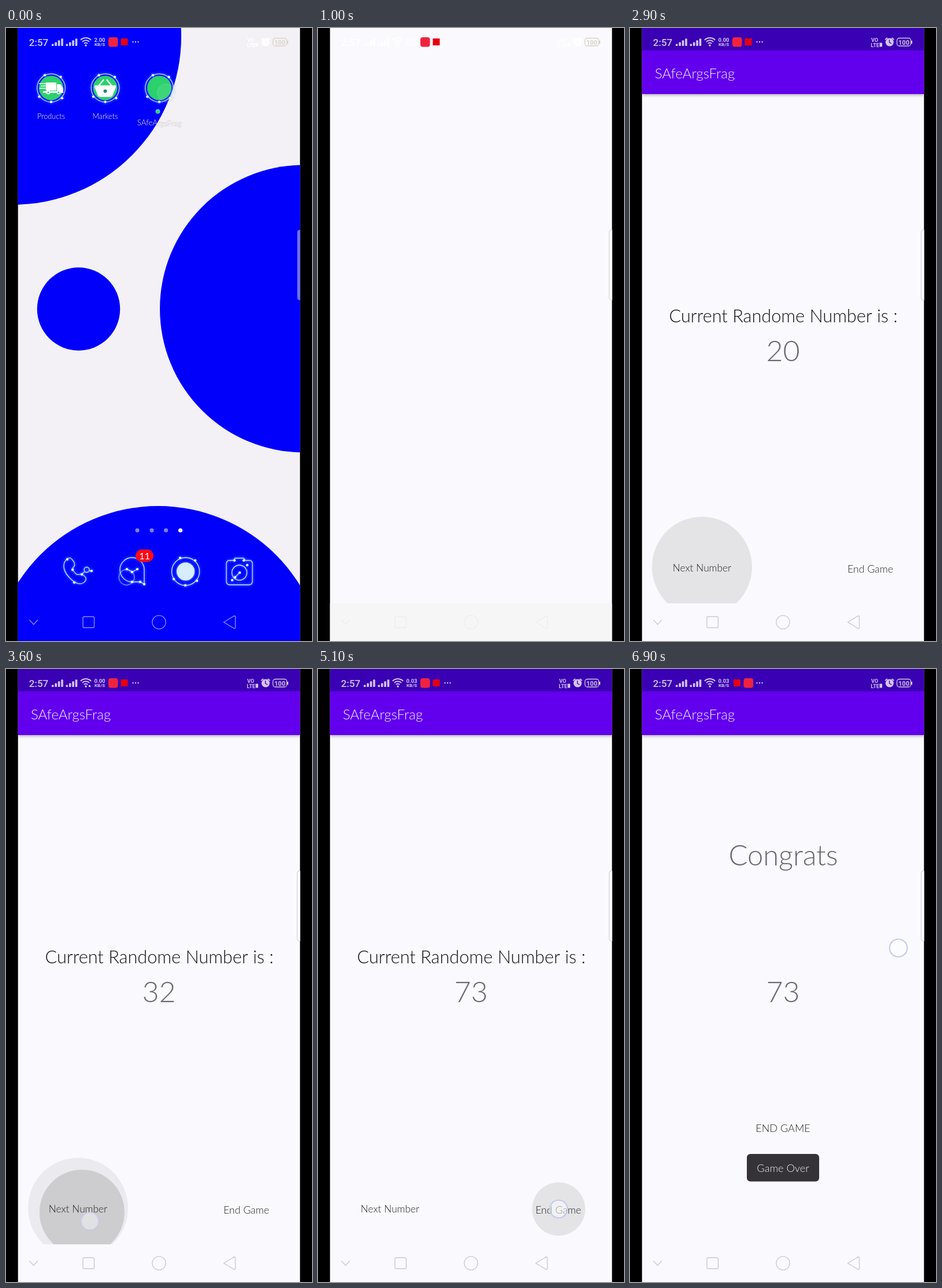
An HTML page with a canvas for the animation above (7000 ms loop, 529 px wide and 1058 px high).

```html
<!DOCTYPE html>
<html lang="en">
<head>
<meta charset="utf-8">
<title>Random number game</title>
<style>
html, body { margin: 0; width: 100%; height: 100%; overflow: hidden; background: #000; }
canvas { display: block; width: 100vw; height: 100vh; }
</style>
</head>
<body>
<canvas id="stage" width="529" height="1058"></canvas>
<script>
const g = document.getElementById('stage').getContext('2d');
const LOOP = 7000, STEP = 100;
const LEFT = 20.5, WIDTH = 488;
const PAGE = '#faf9fd', BLUE = '#0000fb', GREEN = '#2bd26b', NEON = '#c4e4ff';

const clamp = v => Math.max(0, Math.min(1, v));
const mix = (a, b, p) => a + (b - a) * p;

function rect(x, y, w, h, fill, r = 0) {
  g.beginPath();
  g.roundRect(x, y, w, h, r);
  g.fillStyle = fill;
  g.fill();
}
function disc(x, y, r, fill) {
  g.beginPath();
  g.arc(x, y, r, 0, 7);
  g.fillStyle = fill;
  g.fill();
}
function line(d, color, width = 1.3) {
  g.strokeStyle = color;
  g.lineWidth = width;
  g.stroke(new Path2D(d));
}
function ring(x, y, r, color, width = 1.3) {
  g.beginPath();
  g.arc(x, y, r, 0, 7);
  g.strokeStyle = color;
  g.lineWidth = width;
  g.stroke();
}
function text(s, x, y, size, color, align = 'center', font = '300', family = 'Lato, sans-serif') {
  g.font = `${font} ${size}px ${family}`;
  g.textAlign = align;
  g.fillStyle = color;
  g.fillText(s, x, y);
}
const ui = (s, x, y, size, color, weight = '700') =>
  text(s, x, y, size, color, 'center', weight, 'Roboto, sans-serif');

function faded(alpha, draw) {
  g.save();
  g.globalAlpha *= alpha;
  draw();
  g.restore();
}
function glowing(draw) {
  g.save();
  g.shadowColor = '#6cc0ff';
  g.shadowBlur = 4;
  draw();
  g.restore();
}
const nodes = list => list.forEach(([x, y]) => disc(x, y, 2.1, '#fff'));

function statusBar(t, color, right, battery) {
  ui('2:57', 56.5, 31, 17, color, '500');
  for (const x of [79, 103.5])
    for (let i = 0; i < 4; i++) rect(x + i * 5.4, 27.5 - i * 3.1, 3.6, 3.5 + i * 3.1, color, 1);
  for (const r of [4.5, 8.7, 13]) {
    g.beginPath();
    g.arc(138, 30, r, -Math.PI * .75, -Math.PI * .25);
    g.strokeStyle = color;
    g.lineWidth = 2;
    g.stroke();
  }
  disc(138, 30, 1.8, color);
  if (t >= 3400 && t < 4200) rect(143, 28, 3, 3, color);
  const speed = t < 1500 ? '2.00' : t < 4200 ? '0.00' : '0.03';
  ui(speed, 162, 23.5, 9.5, color);
  ui('KB/S', 162, 31, 8, color);
  const swapped = t >= 6600;
  rect(swapped ? 196.5 : 177, 16, 16.5, 16.5, '#f0233f', 4);
  rect(swapped ? 179 : 198.5, 18, 12, 12, '#e60012', 1);
  for (const x of [219.5, 224, 228.5]) disc(x, 24, 1.2, color);

  ui('VO', 423, 23.5, 9, right);
  ui('LTE', 423.5, 32.5, 9, right);
  rect(431.5, 25.5, 4.5, 7, right, 1);
  disc(448.8, 24.5, 7, right);
  line('M441 20L445 17M456.5 20L452.5 17', right, 2);
  line('M448.5 20V25L452 27', t < 1500 ? PAGE : '#3a00b3', 1.4);
  g.beginPath();
  g.roundRect(461.5, 17.5, 24, 13.5, 4);
  g.strokeStyle = battery;
  g.lineWidth = 1.3;
  g.stroke();
  rect(486, 22, 2, 5, battery);
  ui('100', 473.5, 28.5, 11, battery);
}

function navBar(color) {
  line('M40.5 1021.5L47.8 1029.5L55 1021.5', color, 1.4);
  line('M135 1016H150.5Q152.5 1016 152.5 1018V1033Q152.5 1035 150.5 1035H135Q133 1035 133 1033V1018Q133 1016 135 1016Z', color, 1.4);
  ring(264.5, 1025.5, 11.6, color, 1.4);
  line('M376.5 1025.5L394 1015Q396.5 1014 396.5 1016.5V1034.5Q396.5 1037 394 1036Z', color, 1.4);
}

function sideHandle(fill, stroke) {
  rect(503.5, 348.5, 12, 121, fill, 4);
  if (stroke) {
    g.strokeStyle = stroke;
    g.lineWidth = 1.2;
    g.stroke();
  }
}

function touch(x, y, alpha = 1) {
  faded(alpha, () => {
    disc(x, y, 15.5, 'rgba(255,255,255,.55)');
    ring(x, y, 15.3, '#c3c8ec', 2);
  });
}

function appIcon(x) {
  disc(x, 103.5, 21, GREEN);
  glowing(() => {
    ring(x, 103.5, 24.3, NEON, 1.2);
    nodes([[x - 11, 81.5], [x + 16.5, 84.5], [x - 20.5, 118.5], [x, 127.5], [x + 19, 121]]);
  });
}

function truck() {
  rect(69, 94, 18, 14, '#fff', 1);
  g.fillStyle = '#fff';
  g.fill(new Path2D('M88 97H94L99 104V112H64V109H88Z'));
  line('M57 96H69M60 100H69M58 104H69', '#fff', 1.5);
  for (const x of [73, 91]) {
    disc(x, 111, 3.6, '#fff');
    disc(x, 111, 1.5, GREEN);
  }
}

function basket() {
  g.fillStyle = '#fff';
  g.fill(new Path2D('M153 99H190V102L184 117Q183 119 180 119H163Q160 119 159 117L153 102Z'));
  line('M160 100L169 89M183 100L174 89', '#fff', 2.4);
  disc(171.5, 109, 3, '#1a8c78');
}

function dock() {
  glowing(() => {
    line('M106 916C95 925 100 940 112 951C122 961 133 962 138 953C140 948 135 945 131 943C127 941 124 946 121 942C117 938 113 934 117 930C121 926 117 920 114 917C112 914 108 914 106 916Z', NEON);
    ring(139.5, 935, 4.5, NEON);
    line('M131 943L136 938M143 937H148', NEON);
    nodes([[106, 917], [118, 957], [131, 943], [148, 937], [115, 935]]);

    line('M239 960V935A21 21 0 1 0 218 956H232L239 960', NEON);
    ring(208.5, 948, 13.5, NEON, .8);
    line('M209 934L218 939L227 934', NEON);
    nodes([[209, 934], [218, 939], [227, 934], [232, 956], [218, 956], [239, 960]]);

    ring(310.5, 938, 24, NEON);
    disc(310.5, 938, 15.5, '#d6ecff');
    nodes([[301, 914.5], [327, 919], [290, 951], [310, 962], [330, 954]]);

    line('M386 919H393L396 915H411L414 919H421Q426 919 426 925V955Q426 961 420 961H387Q381 961 381 955V925Q381 919 386 919Z', NEON);
    ring(403.5, 940, 13, NEON);
    line('M396 948L404 940', NEON);
    nodes([[395, 919], [411, 919], [417, 927], [404, 940], [396, 948], [391, 953]]);
  });
  rect(224, 900, 31, 21.5, '#fb0a16', 10.7);
  text('11', 239.5, 917, 16, '#fff', 'center', '400');
}

function home(t) {
  rect(LEFT, 0, WIDTH, 1058, '#f3f1f5');
  disc(12, 14, 291, BLUE);
  disc(514, 484.5, 248, BLUE);
  disc(125.5, 485, 71.7, BLUE);
  disc(263, 1113, 288, BLUE);
  [78, 171.5, 265].forEach(appIcon);
  truck();
  basket();
  disc(262.5, 144, 4, '#3fd08a');
  g.save();
  g.shadowColor = 'rgba(0,0,0,.35)';
  g.shadowBlur = 2;
  g.shadowOffsetY = 1;
  text('Products', 78, 157, 12.7, '#fff');
  text('Markets', 171.5, 157, 12.7, '#fff');
  text('SAfeArgsFrag', 265, 168, 13.3, '#fff');
  g.restore();
  [227, 252, 276.5, 301.5].forEach((x, i) => disc(x, 867, 3.6, i == 3 ? '#fff' : '#8080fd'));
  dock();
  sideHandle('rgba(205,205,255,.55)');
  if (t < 300) touch(277, 112, t < 100 ? .15 : .9);
}

function launch(t) {
  home(t);
  const p = 1 - (1 - clamp((t - 200) / 600)) ** 2;
  if (p > 0) faded(clamp(p * 2.5), () =>
    rect(mix(241, LEFT, p), mix(79, 0, p), mix(48, WIDTH, p), mix(48, 1058, p), PAGE, 24 * (1 - p)));
  const light = p > .7;
  statusBar(t, light ? '#fff' : 'rgba(255,255,255,.8)', '#fff', '#dcd3cc');
  navBar(light ? '#ededef' : '#8b8bff');
}

function splash(t) {
  rect(LEFT, 0, WIDTH, 1058, PAGE);
  rect(LEFT, 993, WIDTH, 65, '#f6f6f6');
  statusBar(t, '#fff', '#fff', '#d9d1c8');
  sideHandle('#fff', '#d5d4d8');
  navBar('#eeeeef');
}

const nextTap = { x: 124.5, y: 930, r: 86.5 };
const taps = [
  { ...nextTap, at: 2600, span: 700, from: [140, 946] },
  { ...nextTap, at: 3400, span: 700, from: [145, 953] },
  { ...nextTap, at: 4200, span: 400, from: [142, 950] },
  { x: 416, y: 932, r: 73, at: 5100, span: 700, from: [416, 932] },
];

function ripple(tap, t) {
  const age = t - tap.at;
  if (age < 0 || age >= tap.span) return;
  g.save();
  g.beginPath();
  g.rect(LEFT, 114, WIDTH, 879);
  g.clip();
  if (age < 300) {
    const p = age / 300, [fx, fy] = tap.from;
    disc(tap.x, tap.y, tap.r, `rgba(0,0,0,${.09 * p})`);
    disc(mix(fx, tap.x, p), mix(fy, tap.y, p), tap.r * (1 - .37 * (1 - p) ** .82),
      `rgba(0,0,0,${.09 + .06 * p})`);
  } else {
    disc(tap.x, tap.y, tap.r, `rgba(0,0,0,${.09 * (tap.span - age) / (tap.span - 300)})`);
  }
  g.restore();
}

function gameScreen(t) {
  taps.forEach(tap => ripple(tap, t));
  text('Current Randome Number is :', 265, 508, 30.7, '#111');
  text('Next Number', 124.5, 937.5, 17.3, '#222');
  text('End Game', 415.5, 939.5, 17.7, '#222');
}

function endScreen(t) {
  text('Congrats', 265, 339, 48.8, '#69686c');
  text('END GAME', 264.5, 799, 18, '#222');
  faded(clamp((t - 5500) / 300), () => {
    rect(202, 837, 125, 47.5, '#353338', 6);
    text('Game Over', 264.5, 868, 18.2, '#f2f2f2');
  });
}

function app(t) {
  rect(LEFT, 0, WIDTH, 1058, PAGE);
  const number = t < 2800 ? '2' : t < 3600 ? '20' : t < 4400 ? '32' : '73';
  const ended = clamp((t - 5200) / 200);
  if (ended < 1) faded(1 - ended, () => gameScreen(t));
  if (ended > 0) faded(ended, () => endScreen(t));
  text(number, 264.5, 575, 50, '#69686c');

  g.save();
  g.shadowColor = 'rgba(0,0,0,.3)';
  g.shadowBlur = 5;
  g.shadowOffsetY = 2;
  rect(LEFT, 38, WIDTH, 76, '#6200ee');
  g.restore();
  rect(LEFT, 0, WIDTH, 38.5, '#3a00b3');
  text('SAfeArgsFrag', 43, 87, 24, '#f4eefe', 'left');
  statusBar(t, '#d3c5f0', '#d3c5f0', '#d6c6dc');
  sideHandle('#fdfcff', '#d0cfd3');
  navBar('#cbcace');

  for (const { at, from } of taps)
    if (t >= at && t < at + 300) touch(...from, t < at + 200 ? 1 : .7);
  if (t >= 6900) touch(464, 481.5);
}

function draw(t) {
  rect(0, 0, 529, 1058, '#000');
  g.save();
  g.beginPath();
  g.rect(LEFT, 0, WIDTH, 1058);
  g.clip();
  if (t < 800) launch(t);
  else if (t < 1700) splash(t);
  if (t >= 1500) faded(clamp((t - 1400) / 300), () => app(t));
  g.restore();
}

const start = performance.now();
function tick() {
  const t = (performance.now() - start) % LOOP;
  draw(Math.floor(t / STEP) * STEP);
  requestAnimationFrame(tick);
}
tick();
</script>
</body>
</html>
```
